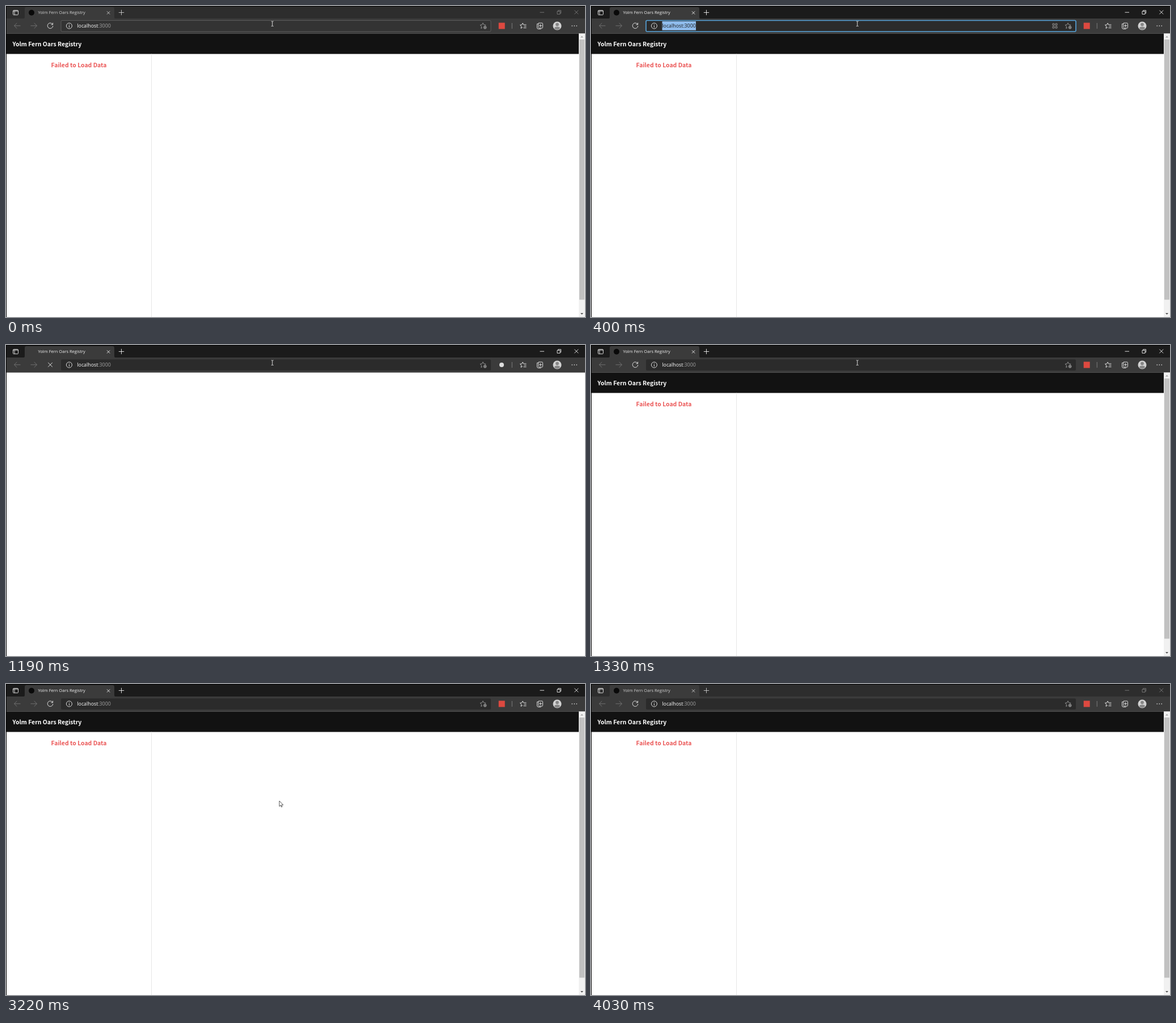
Animation of 1021 by 548 pixels, one loop 4.1 s. Source, as an HTML page:

```html
<!DOCTYPE html>
<html lang="en">
<head>
<meta charset="utf-8">
<title>Registry</title>
<style>
  html, body { margin: 0; width: 100%; height: 100%; overflow: hidden; background: #000; }
  svg { display: block; width: 1021px; height: 548px; }
  .ui { font-family: "Open Sans", "Noto Sans", sans-serif; }
  .heading { font: bold 10.45px "Noto Sans CJK JP", "Noto Sans CJK SC", "Noto Sans CJK", "Noto Sans", sans-serif; }
  .line { fill: none; stroke: #eee; stroke-width: .9; }
  .muted { stroke: #858585; }
</style>
</head>
<body>
<svg viewBox="0 0 1021 548">
  <!-- title bar -->
  <rect id="titleBar" x="1" y="1" width="1020" height="22"/>
  <path d="M30 22.5q3 0 3-3V5q0-3 3-3H188q3 0 3 3V19.5q0 3 3 3Z" fill="#3b3b3b"/>
  <rect class="line" x="12.5" y="7.7" width="9" height="8" rx="1.2"/>
  <path class="line" d="M12.5 9H21.5M15 9V15.5" stroke-width="1.6"/>
  <circle id="favicon" cx="45" cy="11.8" r="5" fill="#090909"/>
  <g id="titleItems">
    <text class="ui" x="56.5" y="14.4" font-size="7.5" fill="#f2f2f2">Yolm Fern Oars Registry</text>
    <path class="line" d="M178 9.4l5.2 5.2m0-5.2l-5.2 5.2M198.8 11.5h9.4M203.5 6.8v9.4"/>
  </g>
  <g id="windowButtons" class="line">
    <path d="M941.5 11.2H949M1002.4 7.6l6.8 6.8m0-6.8l-6.8 6.8"/>
    <path d="M972 9.4h5v5h-5ZM973.6 9.2V7.8h5v5h-1.4"/>
  </g>

  <!-- toolbar -->
  <rect x="1" y="22" width="1020" height="26.5" fill="#3b3b3b"/>
  <path class="line" stroke="#777" style="stroke:#777" d="M25.5 34.8H14.5M19.3 30l-4.8 4.8 4.8 4.8M43.5 34.8h11M49.7 30l4.8 4.8-4.8 4.8"/>
  <path id="reload" class="line" d="M82.2 32.4A4.8 4.8 0 1 0 82.8 35M82.6 29.6v3.2h-3.2" stroke-width="1.1"/>
  <path id="stop" class="line" d="M74.2 31l7.6 7.6m0-7.6l-7.6 7.6" stroke-width="1.1"/>
  <rect id="addressBar" x="97" y="25.5" width="758" height="19.5" rx="2"/>
  <circle class="line" cx="111.4" cy="35" r="5"/>
  <path class="line" d="M111.4 34.2V38M111.4 32v1.1"/>
  <rect id="selection" x="125.5" y="27" width="59.5" height="15.8" fill="#8fbcec"/>
  <text class="ui" x="125.4" y="38.2" font-size="8.8"><tspan id="host">localhost</tspan><tspan id="port">:3000</tspan></text>
  <g id="grid" class="line" style="stroke:#999">
    <path d="M814 31h3v3h-3ZM819 31h3v3h-3ZM814 36h3v3h-3ZM819 36h3v3h-3Z"/>
  </g>
  <g class="line" style="stroke:#999">
    <path d="M840 38.2l-2.2 1.3.7-3.6-2.5-2.4 3.4-.5 1.6-3.2 1.6 3.2 3.4.5-1 1.2"/>
    <circle cx="844.7" cy="37.8" r="2.4" fill="#777"/>
  </g>
  <rect id="extensionActive" x="868.7" y="29.5" width="11" height="11" fill="#dd4940"/>
  <circle id="extensionIdle" cx="874" cy="35" r="4" fill="#ddd"/>
  <path class="line muted" d="M892.3 30v10"/>
  <path class="line" d="M911 37.4l-3 2 .8-3.7-2.4-2.3 3.3-.4 1.5-3 1.4 3H917.500M913.500 35.700h4M912.500 38.500h5"/>
  <path class="line" d="M939 30h6q1.500 0 1.500 1.500v6q0 1.500-1.500 1.500h-4.500q-1.500 0-1.500-1.500ZM938.500 31.500h-2v6.500q0 2.500 2.500 2.500h4.500M942.700 32.200v5M940.200 34.700h5"/>
  <circle cx="972" cy="35" r="7.5" fill="#d2d2d2"/>
  <circle cx="972" cy="32.600" r="2.900" fill="#858585"/>
  <path d="M967 39.500q0-3 5-3t5 3q-2 2.300-5 2.300t-5-2.300Z" fill="#858585"/>
  <path d="M998.200 35h.1M1002.200 35h.1M1006.200 35h.1" stroke="#eee" stroke-width="1.600" stroke-linecap="round"/>

  <!-- web page -->
  <rect x="1" y="48.500" width="1020" height="500" fill="#fff"/>
  <g id="page">
    <rect x="1" y="48.500" width="1009" height="36" fill="#121212"/>
    <text class="heading" x="11.500" y="71.400" fill="#fff">Yolm Fern Oars Registry</text>
    <path d="M256.500 84.500V548" stroke="#e7e7e7"/>
    <text id="message" class="heading" x="128.500" y="108.200" text-anchor="middle" fill="#eb5757">Failed to Load Data</text>
    <rect x="1010" y="48.500" width="11" height="500" fill="#f1f1f1"/>
    <rect x="1011" y="59" width="9" height="458.500" fill="#c1c1c1"/>
    <path d="M1013 55.500l2.500-2.800 2.500 2.800Z" fill="#a3a3a3"/>
    <path d="M1013 541l2.500 2.800 2.500-2.800Z" fill="#505050"/>
  </g>

  <!-- pointers -->
  <path id="beam" class="line" d="M467.800 27h1.400l.5.500.5-.500h1.400M469.700 27.500v7.500M467.800 35.500h1.400l.5-.500.5.500h1.400" stroke-width=".8"/>
  <path id="arrow" d="M0 0V9.700L2.200 7.600 3.700 10.800 5.100 10.200 3.700 7.100H6.800Z" fill="#fff" stroke="#111" stroke-width=".7"/>
</svg>
<script>
const LOOP = 4100;
const el = id => document.getElementById(id);
const show = (id, on) => el(id).style.display = on ? '' : 'none';
const paint = (id, fill, stroke = 'none', width = 1) =>
  Object.entries({ fill, stroke, 'stroke-width': width }).forEach(([k, v]) => el(id).setAttribute(k, v));

// Pointer path: step, x, y. The pointer is sampled about every 69 ms.
const path = [[0, 470, 47.5], [7, 476, 174], [9, 482, 206], [13, 633, 440], [15, 617, 521], [16, 617.5, 539]];
const MOVE = 2600, GONE = 3770;

function pointerAt(t) {
  const step = Math.floor((t - MOVE + 10) / 68.7);
  const next = Math.max(1, path.findIndex(p => p[0] >= step));
  const [s0, x0, y0] = path[next - 1], [s1, x1, y1] = path[next];
  const k = (step - s0) / (s1 - s0);
  return [x0 + (x1 - x0) * k, y0 + (y1 - y0) * k];
}

function render(t) {
  const between = (a, b) => t >= a && t < b;
  const active = between(70, 4030);
  const focused = between(260, 1060);
  const selected = between(330, 1060);
  const hovered = t < 260 || between(MOVE, MOVE + 70);
  const loading = between(1060, 1330);
  const blank = between(1190, 1270);

  paint('titleBar', active ? '#1b1b1b' : '#2d2d2d');
  el('titleItems').style.opacity = active ? 1 : .82;
  el('windowButtons').style.opacity = active ? 1 : .4;
  show('favicon', !between(1060, 1270));
  show('reload', !loading);
  show('stop', loading);

  if (focused) paint('addressBar', '#2b2b2b', '#57a5dc', 1.6);
  else if (hovered) paint('addressBar', '#333', '#606060', .9);
  else paint('addressBar', '#2b2b2b');
  show('selection', selected);
  paint('host', selected ? '#1c1c1c' : '#fff');
  paint('port', selected ? '#1c1c1c' : '#a2a2a2');
  show('grid', between(400, 1060));

  show('extensionActive', !blank);
  show('extensionIdle', blank);
  show('page', !blank);
  show('message', !between(1190, 1330));

  show('beam', t < MOVE);
  const moving = between(MOVE, GONE);
  show('arrow', moving);
  if (moving) el('arrow').setAttribute('transform', `translate(${pointerAt(t)})`);
}

const start = performance.now();
function tick() {
  render((performance.now() - start) % LOOP);
  requestAnimationFrame(tick);
}
tick();
</script>
</body>
</html>
```
